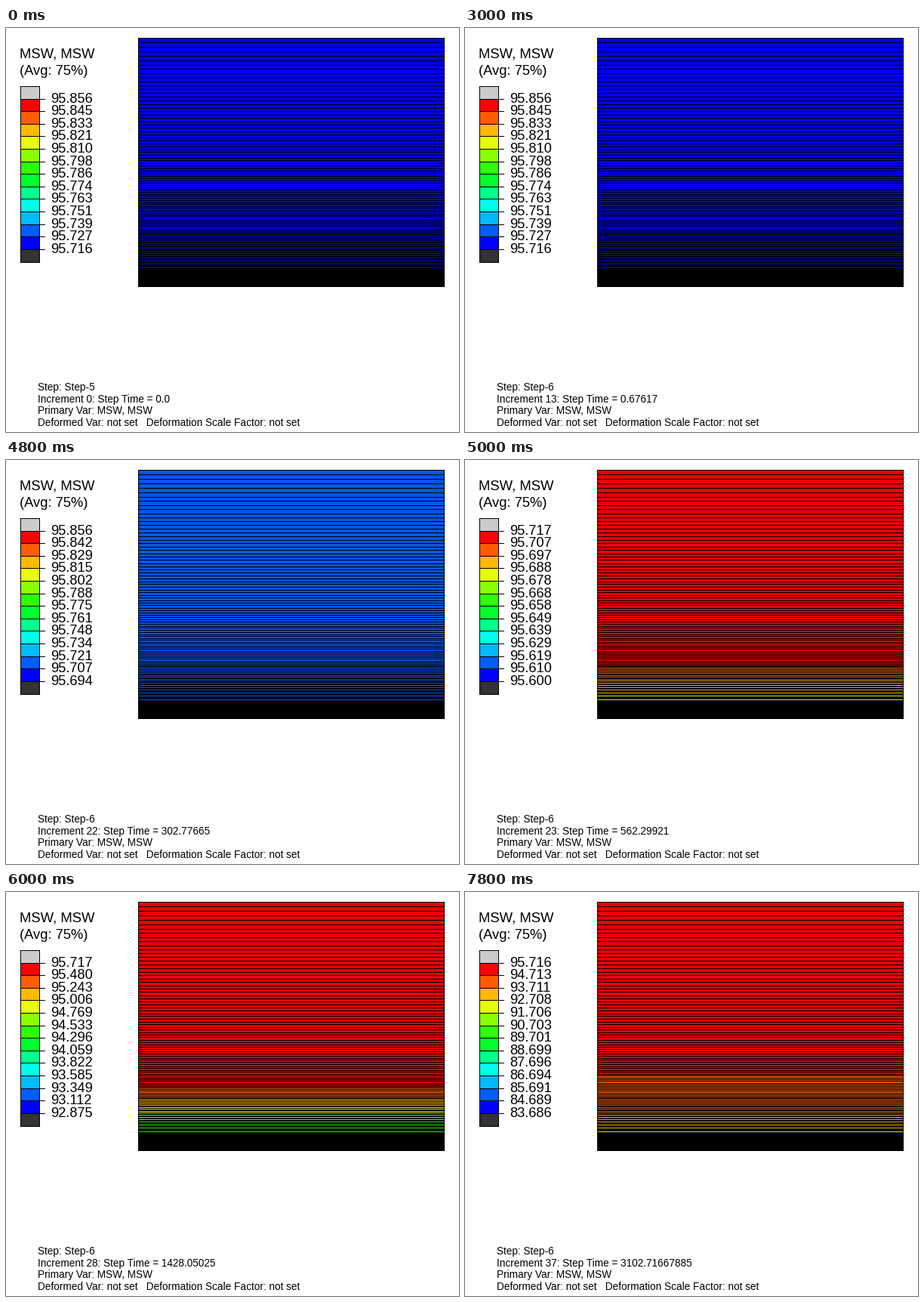
A matplotlib script that plays this animation: 600x535 px, repeating every 8 s.

```python
import numpy as np
import matplotlib.pyplot as plt
from matplotlib.animation import FuncAnimation
from matplotlib.colors import to_rgb
from matplotlib.patches import Rectangle

W, H, DPI = 600, 535, 100
FRAMES, INTERVAL = 40, 200
X0, X1, TOP, BOTTOM, SOLID = 175, 581, 13, 343, 318
BASE = 95.716

BANDS = ["#ff0000", "#ff5d00", "#ffb900", "#e8ff00", "#8bff00", "#2eff00",
         "#00ff2e", "#00ff8b", "#00ffe8", "#00b9ff", "#005dff", "#0000ff"]
SHADED = np.array([to_rgb(c) for c in BANDS]) * 0.92
ROWS = np.arange(TOP, BOTTOM)

# Key states: legend maximum and minimum, then solver time
LIMIT_KEYS = [20, 24, 25, 27, 30, 35, 39]
MAXIMA = [95.85644, 95.8559, 95.71675, 95.71675, 95.7166, 95.7159, 95.7157]
MINIMA = np.array([95.7157, 95.6939, 95.60, 94.28995, 92.875, 88.8489, 83.6863])
TIME_KEYS = [24, 27, 30, 35, 39]
TIMES = [302.77665, 1081.34433, 1428.05025, 2155.64166544, 3102.71667885]


def mesh_mask():
    """Rows covered by element edges; spacing shrinks towards the bottom."""
    mask = ROWS >= SOLID
    y = float(TOP)
    while y < SOLID - 1:
        mask[int(round(y)) - TOP] = True
        y += 6.2 - 0.0165 * (y - TOP)
    mask[SOLID - 1 - TOP] = False
    return mask


MESH = mesh_mask()


def limits(k):
    drop = np.exp(np.interp(k, LIMIT_KEYS, np.log(BASE - MINIMA)))
    return np.interp(k, LIMIT_KEYS, MAXIMA), BASE - drop


def profile(k):
    """Share of the total drop per row: a bell that widens, plus a late edge."""
    depth = np.maximum(SOLID - 1 - ROWS, 0)
    peak = np.interp(k, TIME_KEYS, [0, 0.75, 0.46, 0.25, 0.17])
    width = np.interp(k, TIME_KEYS, [38, 40, 44, 67, 88])
    edge = 0.1 * np.clip((k - 35) / 4, 0, 1)
    return peak * np.exp(-(depth / width) ** 2) + edge * np.exp(-depth / 10)


def field(k):
    hi, lo = limits(k)
    value = BASE - profile(k) * (BASE - lo)
    band = np.clip((12 * (hi - value) / (hi - lo)).astype(int), 0, 11)
    rgb = SHADED[band]
    rgb[MESH] = 0
    return rgb[:, None, :]


def step_time(k):
    if k < 24:
        return np.exp(np.interp(k, [3, 15, 24], np.log([1e-4, 0.67617, TIMES[0]])))
    return np.interp(k, TIME_KEYS, TIMES)


def captions(k):
    if k < 2:
        return "Step: Step-5", f"Increment {k}: Step Time = {k}.0"
    time = "0.0" if k == 2 else f"{step_time(k):.{8 if k > 30 else 5}f}"
    return "Step: Step-6", f"Increment {k - 2}: Step Time = {time}"


fig = plt.figure(figsize=(W / DPI, H / DPI), dpi=DPI, facecolor="white")
ax = fig.add_axes([0, 0, 1, 1])


def box(x, y, w, h, color="black"):
    ax.add_patch(Rectangle((x, y), w, h, facecolor=color, edgecolor="none",
                           linewidth=0, antialiased=False, zorder=3))


def label(x, y, text, px):
    return ax.text(x, y, text, fontsize=px * 72 / DPI, family="Liberation Sans",
                   color="black", va="baseline", ha="left")


image = ax.imshow(field(0), extent=(X0, X1, BOTTOM, TOP), aspect="auto",
                  interpolation="nearest")
ax.set_xlim(0, W)
ax.set_ylim(H, 0)
ax.axis("off")
box(X0, TOP, 1, BOTTOM - TOP)
box(X1 - 1, TOP, 1, BOTTOM - TOP)

label(18, 40, "MSW, MSW", 18.5)
label(18, 61.5, "(Avg: 75%)", 18.4)
edges = [int(77.4 + 16.62 * i) for i in range(15)]
for y, y2, color in zip(edges, edges[1:], ["#cbcbcb", *BANDS, "#333333"]):
    box(19, y, 26, y2 - y, color)
for i, y in enumerate(edges):
    box(19, y, 33 if 0 < i < 14 else 26, 1)
for x in (19, 44):
    box(x, edges[0], 1, edges[-1] - edges[0] + 1)
levels = [label(59, y + 5, "", 18.3) for y in edges[1:14]]

step_text = label(42, 480, "", 13.6)
inc_text = label(42, 496, "", 13.6)
label(42, 511.5, "Primary Var: MSW, MSW", 13.6)
label(42, 527, "Deformed Var: not set   Deformation Scale Factor: not set", 13.6)


def draw(k):
    image.set_data(field(k))
    for text, value in zip(levels, np.linspace(*limits(k), 13)):
        text.set_text(f"{value:.3f}")
    for text, caption in zip((step_text, inc_text), captions(k)):
        text.set_text(caption)
    return [image, step_text, inc_text, *levels]


anim = FuncAnimation(fig, draw, frames=FRAMES, interval=INTERVAL, repeat=True,
                     repeat_delay=0, blit=False)
plt.show()
```
